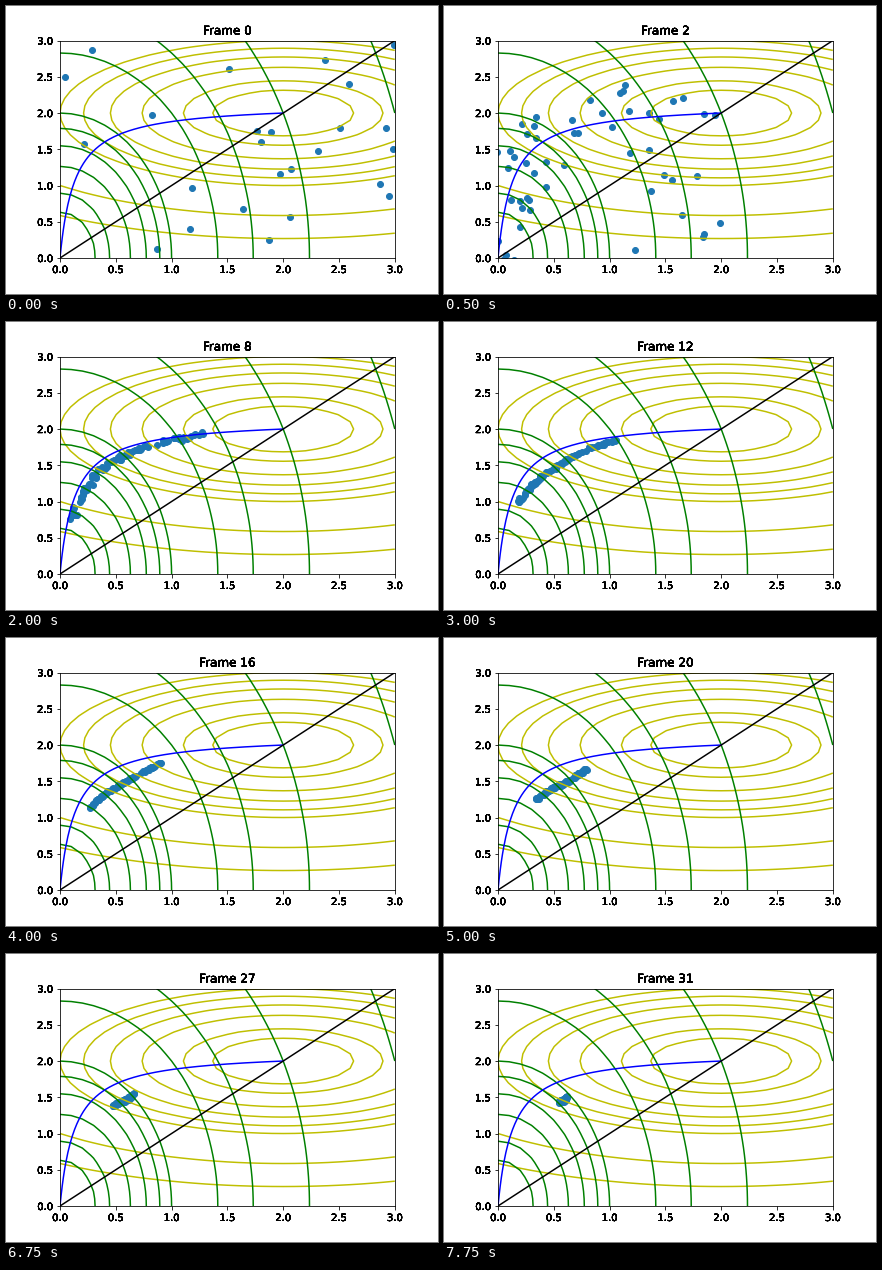
A matplotlib script for the animation above (8 s loop, 432 by 288 pixels).

```python
import numpy as np
import matplotlib.pyplot as plt
from matplotlib.animation import FuncAnimation
from matplotlib.patheffects import Normal

FRAMES, INTERVAL = 32, 250
COUNT = 95
SETTLED = 4  # step at which the population has reached the front
HEAVY = [Normal()] * 12  # repeated drawing hardens the text edges

plt.rcParams["font.family"] = "DejaVu Sans"


def front(x):
    """Curve where the gradients of both objectives are parallel."""
    return 32 * x / (15 * x + 2)


def cloud(step, u, rng):
    """Points at ranks u (0..1) along a shrinking arc that sinks below the front."""
    s = step - SETTLED
    left = max(0, .04 + .019 * s)
    right = .5 + 1.1 * np.exp(-s / 12)
    x = left + (right - left) * u ** (1 + np.exp(-s / 6))

    # the low end leaves the front first, the high end last
    delay = 3 + 15 * u ** 2
    sink = .28 * (1 - np.exp(-(max(s, 0) / delay) ** (1 + u)))

    jitter = .008 + .08 * np.exp(-s / 2)
    pts = np.column_stack([x, front(x) - sink])
    return pts + rng.normal(0, jitter, pts.shape) * (.7, 1)


def population(step):
    rng = np.random.default_rng(100 + step)
    strays = rng.uniform(0, 3 - .5 * step if step < 5 else 1,
                         (max(0, 25 - 6 * step), 2))
    return np.vstack([strays, cloud(step, ranks[:24 * step], rng)])


ranks = np.random.default_rng(7).uniform(0, 1, COUNT)

fig, ax = plt.subplots(figsize=(6, 4), dpi=72)
fig.subplots_adjust(left=.125, right=.9, bottom=.125, top=.88)

dots = ax.scatter([], [], s=36, color="C0", zorder=1)

grid = np.linspace(0, 3, 31)
X, Y = np.meshgrid(grid, grid)
levels = [.1, .2, .4, .6, .8, 1, 2, 3, 5, 10]
ax.contour(X, Y, (X - 2) ** 2 / 4 + (Y - 2) ** 2, levels[:8], colors="y")
ax.contour(X, Y, X ** 2 + Y ** 2 / 4, levels, colors="g")

x = np.linspace(0, 2, 200)
ax.plot(x, front(x), "b")
ax.plot([0, 3], [0, 3], "k")

ax.set(xlim=(0, 3), ylim=(0, 3))
ticks = np.arange(0, 3.1, .5)
ax.set_xticks(ticks)
ax.set_yticks(ticks)
title = ax.set_title("Frame 0", fontsize=12, path_effects=HEAVY)
for label in ax.get_xticklabels() + ax.get_yticklabels():
    label.set_path_effects(HEAVY)


def update(step):
    dots.set_offsets(population(step))
    title.set_text(f"Frame {step}")
    return dots, title


anim = FuncAnimation(fig, update, frames=FRAMES, interval=INTERVAL,
                     repeat=True, repeat_delay=0, blit=False)
plt.show()
```
